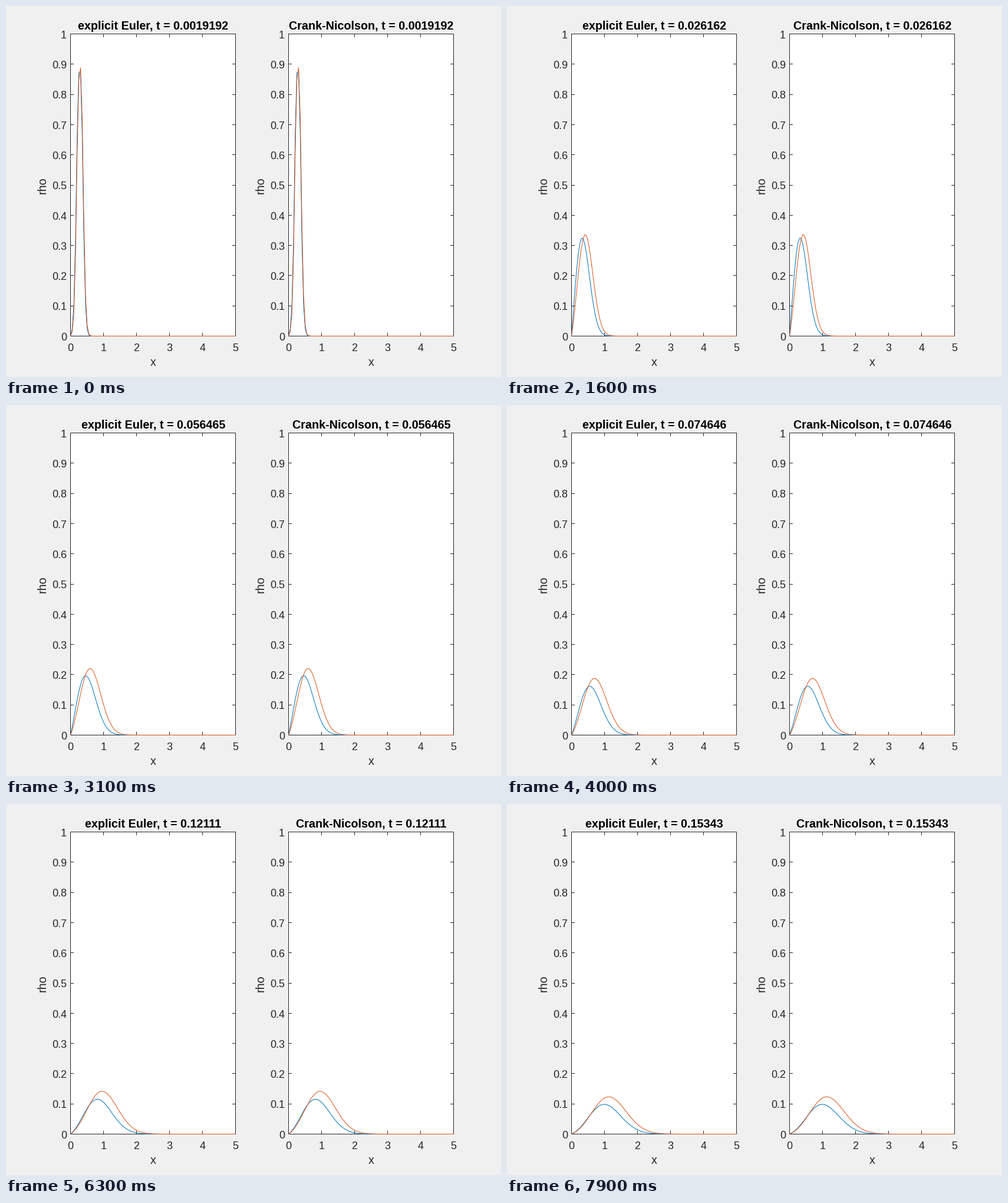
Animation of 840x630 px, one loop 8 s. Source, as a matplotlib script:

```python
import numpy as np
import matplotlib.pyplot as plt
from matplotlib.animation import FuncAnimation
from matplotlib.patches import Rectangle

W, H = 840, 630
TOP, BOTTOM, WIDTH = 47.5, 560.5, 280
INK = "#262626"
BLUE, ORANGE = "#0072BD", "#D95319"

# Drift-diffusion of a box: row 0 has an oscillating drift, row 1 a constant one
N, V, SKIP, SHOTS = 100, 5.0, 20, 76
x = np.linspace(0, 5, N)
dx = x[1]
dt = dx / 500
start = np.tile(((x > 0.2) & (x < 0.4)).astype(float), (2, 1))

lap = (np.eye(N, k=1) - 2 * np.eye(N) + np.eye(N, k=-1)) / dx**2
lap[[0, -1]] = 0
forward = np.eye(N) + dt / 2 * lap
cn_inv = np.linalg.inv(np.eye(N) - dt / 2 * lap)


def drift(rho, t):
    flux = rho * np.array([[V * np.sin(4 * np.pi * t)], [V]])
    out = np.zeros_like(rho)
    out[:, 1:-1] = (flux[:, :-2] - flux[:, 2:]) / (2 * dx)
    return out


def euler(rho, t):
    return rho + dt * (drift(rho, t) + rho @ lap.T)


def crank_nicolson(rho, t):
    base, old = rho @ forward.T, drift(rho, t)
    new = rho
    for _ in range(2):
        new = (base + dt / 2 * (old + drift(new, t + dt))) @ cn_inv.T
    return new


def solve(step):
    rho, shots = start.copy(), []
    for k in range(SHOTS):
        for j in range(SKIP):
            rho = step(rho, (SKIP * k + j) * dt)
        shots.append(rho)
    return shots


plt.rcParams["font.family"] = "Liberation Sans"
fig = plt.figure(figsize=(W / 72, H / 72), dpi=72, facecolor="#f0f0f0")
ax = fig.add_axes([0, 0, 1, 1])
ax.set_xlim(0, W)
ax.set_ylim(H, 0)
ax.axis("off")


def to_y(rho):
    return BOTTOM - (BOTTOM - TOP) * rho


def label(px, py, text, size, ha="center", color=INK, **kw):
    return ax.text(px, py, text, fontsize=size, ha=ha, va="baseline",
                   color=color, **kw)


def rule(x0, y0, x1, y1):
    ax.plot([x0, x1], [y0, y1], color=INK, lw=1, snap=False,
            solid_capstyle="butt", zorder=2)


class Panel:
    def __init__(self, left, name, step):
        self.left, self.name = left, name
        self.shots = solve(step)
        right = left + WIDTH
        ax.add_patch(Rectangle((left, TOP), WIDTH, BOTTOM - TOP, fc="white",
                               lw=0, snap=False))
        for y in (TOP, BOTTOM):
            rule(left - 0.5, y, right + 0.5, y)
        for px in (left, right):
            rule(px, TOP, px, BOTTOM)
        for i in range(6):
            px = left + WIDTH * i / 5
            rule(px, BOTTOM, px, BOTTOM - 5.5)
            rule(px, TOP, px, TOP + 5.5)
            label(px, 586, str(i), 18)
        for i in range(11):
            # whole-pixel ticks stay crisp without snapping
            y = np.floor(to_y(i / 10)) + 0.5
            rule(left, y, left + 5.5, y)
            rule(right, y, right - 5.5, y)
            label(left - 6.5, round(to_y(i / 10) + 7.3), f"{i / 10:g}", 18, "right")
        mid = left + WIDTH / 2 + 0.5
        label(mid, 611, "x", 19.8)
        label(left - 41.5, 304.5, "rho", 19.8, rotation=90, rotation_mode="anchor")
        self.title = label(mid, 40, "", 19.8, weight="bold", color="black")
        self.curves = [
            ax.plot([], [], color=c, lw=1, snap=False, solid_joinstyle="round",
                    solid_capstyle="butt", zorder=3)[0]
            for c in (BLUE, ORANGE)
        ]

    def show(self, k):
        t = (SKIP * k + SKIP - 1) * dt
        self.title.set_text(f"{self.name}, t = {t:.5g}")
        for curve, rho in zip(self.curves, self.shots[k]):
            curve.set_data(self.left + WIDTH * x / 5, to_y(rho))


panels = [
    Panel(109.5, "explicit Euler", euler),
    Panel(479.5, "Crank-Nicolson", crank_nicolson),
]


def draw(i):
    k = max(0, i - 4)  # the opening state holds for half a second
    for p in panels:
        p.show(k)
    return []


anim = FuncAnimation(fig, draw, frames=80, interval=100, repeat=True,
                     repeat_delay=0, blit=False)
plt.show()
```
